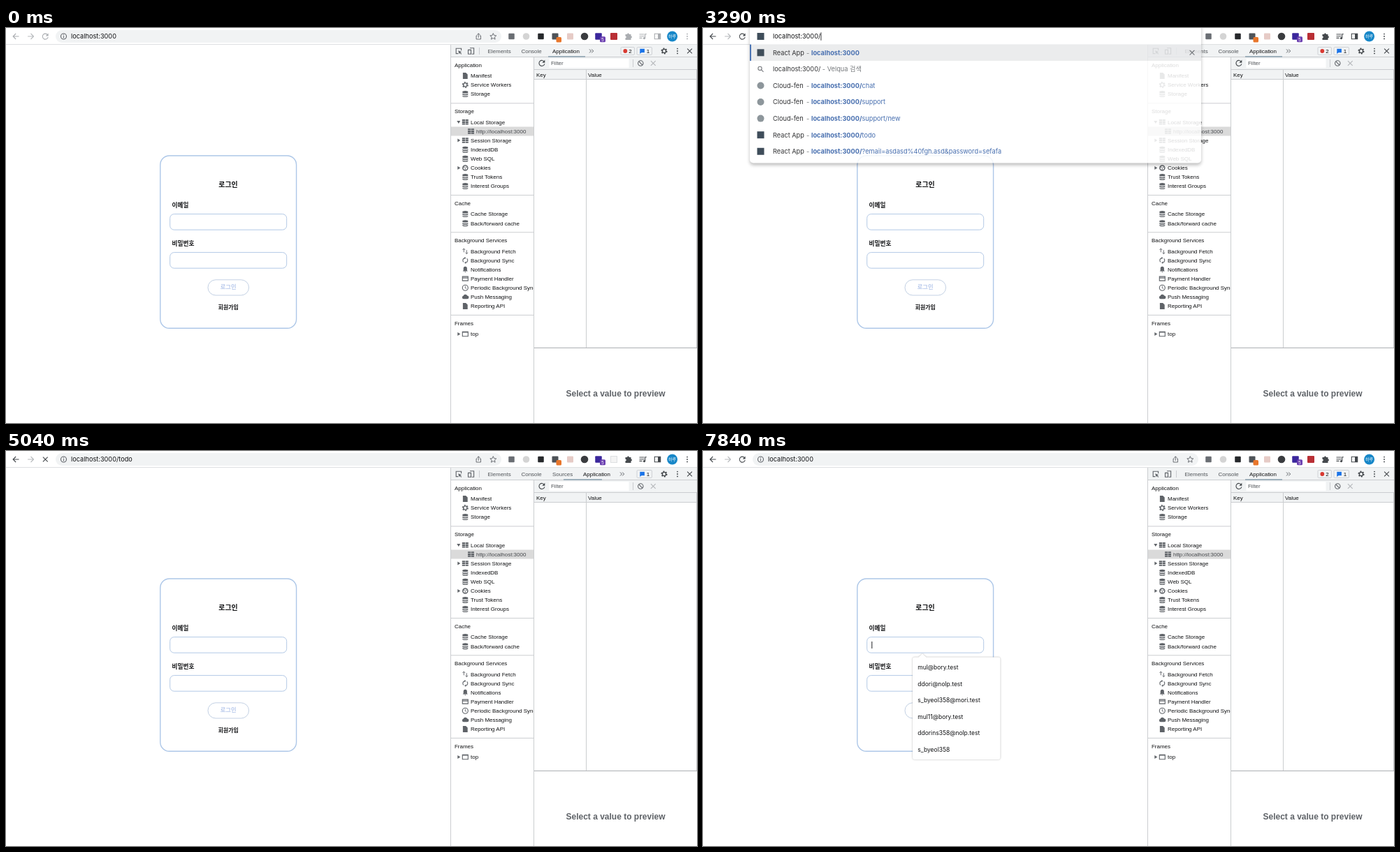
These frames come from a looping animation (989 px wide and 566 px high, 8 s). An HTML page:

```html
<!DOCTYPE html>
<html lang="ko">
<head>
<meta charset="utf-8">
<title>Login redirect</title>
<style>
  html, body { margin: 0; width: 100%; height: 100%; overflow: hidden; background: #fff; }
  svg { display: block; font-family: Inter, 'Noto Sans CJK KR', 'Noto Sans CJK', sans-serif; fill: #111214; }
  text { white-space: pre; }
  .dev { font-family: 'Liberation Sans', Arial, sans-serif; font-size: 7.97px; }
  .icon { fill: none; stroke: currentColor; stroke-width: 1.1; }
  .icon .solid { fill: currentColor; stroke: none; }
  .muted { fill: #606468; }
  .url { fill: #2a58a3; }
  .bold { font-weight: 700; }
  .menu { filter: drop-shadow(0 3px 2.5px rgba(0, 0, 0, .3)); }
  .modal { filter: drop-shadow(0 1px 2.5px rgba(0, 0, 0, .4)); }
  .hint { filter: drop-shadow(0 .5px 1px rgba(0, 0, 0, .3)); }
</style>
</head>
<body>
<svg id="stage" width="989" height="566" viewBox="0 0 989 566"></svg>
<script>
const LOOP = 8000;
const HOST = 'localhost:3000';
const GRAY = '#5f6368';

const text = (x, y, s, size, attrs = '') =>
  `<text x="${x}" y="${y}" ${size ? `font-size="${size}"` : ''} ${attrs}>${s}</text>`;
const rect = (x, y, w, h, fill, attrs = '') =>
  `<rect x="${x}" y="${y}" width="${w}" height="${h}" fill="${fill}" ${attrs}/>`;
const box = (x, y, w, h, r, stroke, width = 1) =>
  rect(x, y, w, h, '#fff', `rx="${r}" stroke="${stroke}" stroke-width="${width}"`);
const rule = (d, color = '#cbcdd0', width = 1) =>
  `<path d="${d}" fill="none" stroke="${color}" stroke-width="${width}"/>`;
const dot = (x, y, r, fill) => `<circle cx="${x}" cy="${y}" r="${r}" fill="${fill}"/>`;
const group = (id, body, attrs = '') => `<g id="${id}" ${attrs}>${body}</g>`;
const line = (d, attrs = '') => `<path d="${d}" ${attrs}/>`;
const solid = d => `<path class="solid" d="${d}"/>`;

const ICONS = {
  back: line('M4.2 0h-8.4m4-4l-4 4 4 4'),
  forward: line('M-4.2 0h8.4m-4-4l4 4-4 4'),
  reload: line('M3.4-2a4 4 0 1 0 .5 3') + solid('M4.3-4.6v4h-4z'),
  close: line('M-3.4-3.4l6.8 6.8m0-6.8l-6.8 6.8'),
  info: '<circle r="4"/>' + line('M0-.6v2.8M0-2.4v1'),
  share: line('M-1.8-1h-1.4v5h6.4v-5h-1.4M0 1.8v-6m-2 2l2-2 2 2', 'stroke-width=".9"'),
  star: line('M0-4.4l1.3 3 3.2.3-2.4 2.1.7 3.2-2.8-1.7-2.8 1.7.7-3.2-2.4-2.1 3.2-.3z', 'stroke-width=".9"'),
  puzzle: solid('M-4.5-3h2.6a1.4 1.4 0 0 1 2.8 0h2.6v2.6a1.4 1.4 0 0 1 0 2.8v2.6h-8v-2.7a1.3 1.3 0 0 0 0-2.6z'),
  playlist: line('M-5-3h7m-7 2.7h7m-7 2.7h4M3.2 2.5v-5.8h2.2') + '<circle class="solid" cx="2" cy="2.6" r="1.6"/>',
  panel: line('M-4.2-3.8h8.4v7.6h-8.4z') + solid('M.5-4h4v8h-4z'),
  dots: line('M0-3.4h.01M0 0h.01M0 3.4h.01', 'stroke-linecap="round" stroke-width="1.9"'),
  globe: '<circle class="solid" r="4.5"/>' + line('M-3.8-1.2h2.2l1.6 1.4-.8 3.2M.8-3.6l-.6 1.8 1.6.8.6 1.6 1.4.2', 'stroke="#fff"'),
  search: '<circle cx="-1" cy="-1" r="2.6"/>' + line('M1 1l3 3'),
  inspect: line('M3.6-.8v-3h-7.4v7.4h3') + solid('M-.8-.8l5 2-2 .8 2 2-.8.8-2-2-.8 1.6z'),
  device: line('M-1.5-4.2h5.6v8.4h-3M-4-1.6h4v5.8h-4z'),
  block: '<circle r="3.7"/>' + line('M-2.6-2.6l5.2 5.2'),
  file: solid('M-3.4-4.5h4.2l2.6 2.6v6.4h-6.8z'),
  gear: '<circle r="2.6" stroke-width="1.4"/><circle r="3.8" stroke-width="1.5" stroke-dasharray="1.9 2.08"/>',
  db: solid('M-4-3q0-1.5 4-1.5t4 1.5v.9q0 1.2-4 1.2t-4-1.2zM-4-1q0 1.4 4 1.4t4-1.4v1.7q0 1.3-4 1.3t-4-1.3zM-4 1.8q0 1.4 4 1.4t4-1.4v1.2q0 1.5-4 1.5t-4-1.5z'),
  table: [-3.8, -1.1, 1.6].map(y => solid(`M-4.5 ${y}h4.2v2.1h-4.2zM.3 ${y}h4.2v2.1h-4.2z`)).join(''),
  cookie: '<circle r="3.5" stroke-width="1.5"/>' + line('M-1.6-1h.01M1.2-.8h.01M0 1.4h.01', 'stroke-linecap="round" stroke-width="1.7"'),
  updown: line('M-2 1.5v-5.3m-1.8 1.8l1.8-1.8 1.8 1.8M2-1.5v5.3m-1.8-1.8l1.8 1.8 1.8-1.8', 'stroke-width=".9"'),
  sync: line('M-2.4 2.5a3.4 3.4 0 0 1 1.6-5.8M2.4-2.5a3.4 3.4 0 0 1-1.6 5.8') + solid('M-1-5l2.2 1.7-2.2 1.7zM1 5l-2.2-1.7 2.2-1.7z'),
  bell: solid('M-3.6 2.6h7.2l-1-1.4v-2.4q0-3-2.6-3t-2.6 3v2.4zM-1.1 3.2h2.2l-1.1 1.2z'),
  card: line('M-4-3h8v6h-8zM-4-1h8'),
  clock: '<circle r="4"/>' + line('M0-2.5v2.8l1.8 1', 'stroke-width=".9"'),
  cloud: solid('M-2.4 3a2.3 2.3 0 0 1-.3-4.5a3 3 0 0 1 5.6-.3a2.4 2.4 0 0 1-.3 4.8z'),
  window: line('M-4-3.2h8v6.6h-8zM-4-2.4h8'),
  react: rect(-5, -5, 10, 10, '#203040', 'stroke="none"'),
  earth: '<circle r="5" fill="#7b858b" stroke="none"/>'
};
const icon = (name, x, y, color = GRAY, id = '') =>
  `<g ${id && `id="${id}"`} class="icon" transform="translate(${x} ${y})" ${color && `color="${color}"`}>${ICONS[name]}</g>`;

function loginPage() {
  const field = (label, y) => text(237.5, y, label, 8.7, 'class="bold"') + box(234.7, y + 9.2, 167, 22.6, 6, '#b3c9e6');
  return box(220.8, 183, 194.8, 247.2, 13, '#adc7e8', 1.4) +
    text(318, 228.3, '로그인', 10, 'text-anchor="middle" class="bold"') +
    field('이메일', 257.4) + field('비밀번호', 312.4) +
    box(289, 360.8, 58.6, 22.2, 11.1, '#c3d1e4') +
    text(318.2, 374.4, '로그인', 8.3, 'text-anchor="middle" class="bold" style="fill:#b9caec"') +
    text(318.2, 403.3, '회원가입', 7.9, 'text-anchor="middle" class="bold"');
}

const SECTIONS = [
  [53, 'Application', 'file:Manifest', 'gear:Service Workers', 'db:Storage'],
  [119.5, 'Storage', 'table:Local Storage:open', 'table:' + HOST + ':sub', 'table:Session Storage:closed', 'db:IndexedDB',
    'db:Web SQL', 'cookie:Cookies:closed', 'db:Trust Tokens', 'db:Interest Groups'],
  [251.2, 'Cache', 'db:Cache Storage', 'db:Back/forward cache'],
  [304.4, 'Background Services', 'updown:Background Fetch', 'sync:Background Sync', 'bell:Notifications',
    'card:Payment Handler', 'clock:Periodic Background Sync', 'cloud:Push Messaging', 'file:Reporting API'],
  [423, 'Frames', 'window:top:closed']
];

function sidebar() {
  return SECTIONS.map(([top, title, ...rows], i) =>
    (i ? rule(`M637 ${top - 11.6}H755`) : '') + text(642, top + 2.8, title) +
    rows.map((row, j) => {
      const y = top + 15.4 + j * 13.1;
      const parts = row.split(':');
      const kind = parts[parts.length - 1];
      if (kind === 'sub')
        return rect(637, y - 6.5, 118.5, 13, '#dadada') + icon('table', 665.5, y) + text(673, y + 2.8, 'http://' + HOST, 0, 'fill="#45484c"');
      const arrow = { open: `M645.3 ${y - 1.8}h5l-2.5 4z`, closed: `M646.3 ${y - 2.5}v5l4-2.5z` }[kind];
      return (arrow ? `<path d="${arrow}" fill="#5f6368"/>` : '') + icon(parts[0], 657.3, y) + text(665, y + 2.8, parts[1]);
    }).join('')).join('');
}

function devtools() {
  const tab = (x, s, active) => text(x, 35.8, s, 0, active ? '' : 'fill="#505458"');
  const underline = (from, to) => rule(`M${from} 41H${to}`, '#5f7f93');
  const more = x => rule(`M${x - 3} 30.5l2.5 2.5-2.5 2.5m3.2-5l2.5 2.5-2.5 2.5`, GRAY);
  const badge = (x, w) => rect(x, 27.5, w, 11, '#f1f3f4', 'rx="1.5" stroke="#cfd2d6"');
  return rect(637, 24, 352, 542, '#fff') + sidebar() +
    rect(755.5, 41, 234, 525, '#fff') + rect(637, 24, 352, 17.5, '#f1f3f4') + rect(756, 42, 233, 31.5, '#f1f3f4') +
    rule('M636.5 24V566M637 41.5H989M755.5 42V566M756 59.5H989M756 73.5H989M830.5 60V458M988.5 60V458') +
    rule('M756 458.4H989', '#b9bbbe', 1.3) +
    icon('inspect', 648, 33) + icon('device', 665.5, 33) + rule('M677.5 28V38') +
    tab(689.5, 'Elements') + tab(737.5, 'Console') +
    group('tabs', tab(782, 'Application', 1) + underline(776, 829) + more(838) + badge(880, 19.5) +
      dot(886.3, 33, 2.9, '#d93a32') + text(891.3, 35.8, '2', 0, 'id="errors"')) +
    group('loadingTabs', tab(782, 'Sources') + tab(826, 'Application', 1) + underline(798, 853) + more(882)) +
    badge(903, 21.5) + rect(907.3, 29.8, 6.6, 5.4, '#1a73e8') + `<path d="M907.3 34.5h3l-3 2.6z" fill="#1a73e8"/>` +
    text(916.8, 35.8, '1') +
    icon('gear', 942, 33, '#45494d') + icon('dots', 961, 33, '#45494d') + icon('close', 978.5, 33, '#45494d') +
    icon('reload', 767, 50.3, '#45494d') + rect(777.5, 44, 114, 13, '#fff') + text(780, 53.4, 'Filter', 0, 'fill="#505458"') +
    rule('M897.5 45V56') + icon('block', 908.3, 50.5) + icon('close', 926.3, 50.5, '#b4b7ba') +
    text(759, 69.7, 'Key') + text(833, 69.7, 'Value') +
    text(872.5, 528, 'Select a value to preview', 12, `text-anchor="middle" font-weight="bold" style="fill:${GRAY}"`);
}

function toolbar() {
  const square = (x, fill, size = 9) => rect(x - size / 2, 12 - size / 2, size, size, fill, 'rx="1"');
  return rect(0, 0, 989, 24, '#fff') + rule('M0 23.6H989', '#dcdee0') +
    group('chrome', icon('back', 14.3, 12, '') + icon('reload', 56.3, 12, '', 'reload') + icon('close', 56.3, 12, '', 'stop') +
      icon('puzzle', 891, 12, '') + icon('playlist', 911.5, 12, '') + icon('panel', 932.5, 12, '') + icon('dots', 975, 12, '')) +
    icon('forward', 35.3, 12, '#b7babd') +
    square(723.5, '#6a6e73', 8.5) + dot(744.5, 12, 4.8, '#d4d4d4') + square(765.5, '#26282b', 8.5) +
    square(786, '#4e5358') + rect(787.5, 13, 7.5, 7.5, '#e8762b', 'rx="1.5"') + square(807.5, '#e6cbc6') +
    dot(828, 12, 5.3, '#3a3c3f') + square(848, '#3b279c', 9.5) + rect(850, 12.2, 8, 8, '#6b3fb0', 'rx="1.5"') +
    text(854, 18.9, '5', 6.5, 'text-anchor="middle" style="fill:#fff"') +
    group('extension', square(870, '#b92f35', 10)) + group('dimExtension', rect(865.5, 7.5, 9, 9, '#f4f4f4', 'stroke="#dddfe1"')) +
    dot(953.6, 12, 7.5, '#1787c8') + text(953.6, 14.3, '하루', 6, 'text-anchor="middle" style="fill:#fff"') +
    group('omnibox', rect(71, 3, 638, 18, '#f1f3f4', 'id="pill" rx="9"') + icon('share', 676.3, 12) + icon('star', 697.3, 12));
}

const REACT = 'React App', EARTH = 'Cloud-fen';
const searchRow = typed => ['search', '', '', `${HOST}/${typed}<tspan class="muted"> - Velqua 검색</tspan>`];
const todoRow = typed => ['react', REACT, `${HOST}/${typed}`, 'todo'.slice(typed.length)];
const completing = typed => [todoRow(typed), searchRow(typed)];
const SUGGESTIONS = [
  { at: 3290, typed: '', rest: '', rows: [
    ['react', REACT, HOST, ''], searchRow(''),
    ['earth', EARTH, HOST + '/', 'chat'], ['earth', EARTH, HOST + '/', 'support'], ['earth', EARTH, HOST + '/', 'support/new'],
    todoRow(''), ['react', REACT, HOST + '/', '?email=asdasd%40fgh.asd&amp;password=sefafa']] },
  { at: 3780, typed: 't', rest: 'odo', rows: completing('t') },
  { at: 4060, typed: 'to', rest: 'do', rows: completing('to') },
  { at: 4550, typed: 'to', rest: '', rows: [['globe', '', HOST + '/to', ''], searchRow('to'), todoRow('to')] },
  { at: 4690, typed: 'tod', rest: 'o', rows: completing('tod') },
  { at: 4760, typed: 'todo', rest: '', rows: completing('todo') }
];

function popup({ rows }) {
  const bottom = 28.4 + rows.length * 23.58;
  return rect(67, -6, 646, bottom + 6, '#fff', 'rx="5" class="menu"') +
    rect(67, 23.6, 646, 23.4, '#e8e9eb') + rect(67, 23.6, 2, 23.4, '#2f5fa8') +
    rows.map(([mark, title, bold, rest], i) => {
      const y = 35.3 + i * 23.58;
      const link = `<tspan class="bold">${bold}</tspan>${rest}`;
      return icon(mark, 82.5, y) + (title
        ? text(100, y + 3.3, title, 9.2) + text(148, y + 3.3, '-', 9.2, 'class="muted"') + text(155, y + 3.3, link, 9.2, 'class="url"')
        : text(100, y + 3.3, link, 9.2, bold && 'class="url"'));
    }).join('') +
    (rows[0][1] ? icon('close', 700, 35.3) : '') + icon(rows[0][0], 82.5, 12);
}

const dialog = () => rect(348, 22, 293, 84.6, '#fff', 'rx="3" class="modal"') +
  text(358.5, 42.3, HOST + ' 내용:', 9.8) + text(358.5, 61.3, 'Unauthorized', 8.3) +
  rect(588.7, 75.2, 42, 21, '#1a73e8', 'rx="2.5"') +
  text(609.5, 88.4, '확인', 7.6, 'text-anchor="middle" font-weight="700" style="fill:#fff"');

const EMAILS = ['mul@bory.test', 'ddori@nolp.test', 's_byeol358@mori.test', 'mul11@bory.test', 'ddorins358@nolp.test', 's_byeol358'];
const autofill = () => rect(241.3, 273, 1, 10, '#202124') +
  `<path class="hint" d="M303 295.5h5.500l5.500-5 5.500 5h103q3 0 3 3v140.500q0 3-3 3h-119.500q-3 0-3-3v-140.500q0-3 3-3z" fill="#fff"/>` +
  EMAILS.map((email, i) => text(307.3, 313.2 + i * 23.55, email, 8.5)).join('');

const $ = id => document.getElementById(id);
$('stage').innerHTML = loginPage() + group('dev', devtools(), 'class="dev"') + toolbar() + group('popup', '') +
  group('address', icon('info', 82.5, 12, GRAY, 'info') + rect(93, 6, 0, 12, '#b3d4fc', 'id="selection"') +
    text(93, 15.2, HOST, 9.2, 'id="url"') + rect(158, 6.3, .9, 11.5, '#202124', 'id="caret"')) +
  group('dialog', dialog()) + group('autofill', autofill());

const show = (id, opacity) => $(id).setAttribute('opacity', +opacity);
const set = (id, attrs) => Object.entries(attrs).forEach(([k, v]) => $(id).setAttribute(k, v));
const between = (t, a, b) => t >= a && t < b;
const ramp = (t, a, b) => Math.min(1, Math.max(0, (t - a) / (b - a)));
let shown;

function render(t) {
  const focused = between(t, 1960, 5040);
  const suggesting = between(t, 3290, 5040);
  const loading = between(t, 5040, 5180);
  const selectedAll = between(t, 2030, 2730);
  const suggestion = suggesting && SUGGESTIONS.filter(s => t >= s.at).pop();

  $('chrome').style.color = t < 1960 ? '#aaadb1' : '#45494d';
  show('reload', !loading);
  show('stop', loading);
  show('tabs', !loading);
  show('loadingTabs', loading);
  show('extension', !loading);
  show('dimExtension', loading);
  $('errors').textContent = between(t, 5180, 6300) ? 1 : 2;

  show('omnibox', !suggesting);
  set('pill', focused ? { fill: '#fff', stroke: '#34619f', 'stroke-width': 1.7 } : { fill: '#f1f3f4', stroke: 'none' });
  show('info', !suggesting);
  show('popup', suggesting && (t < 3360 ? .86 : 1));
  if (suggestion && suggestion !== shown) $('popup').innerHTML = popup(shown = suggestion);

  const x = suggesting ? 100 : 93;
  const typed = suggesting ? `${HOST}/${suggestion.typed}` : loading ? HOST + '/todo' : HOST;
  const value = typed + (suggesting ? suggestion.rest : '');
  if ($('url').textContent !== value) $('url').textContent = value;
  set('url', { x });
  const full = $('url').getComputedTextLength();
  const head = selectedAll ? 0 : $('url').getSubStringLength(0, typed.length);
  set('selection', { x: x + head, width: Math.max(0, full - head) });
  set('caret', { x: x + head + .2 });
  show('selection', focused && full - head > 1);
  show('caret', focused && full - head <= 1);

  const first = ramp(t, 5200, 5460) * (1 - ramp(t, 6170, 6300));
  const second = ramp(t, 6310, 6510) * (1 - ramp(t, 6730, 6930));
  show('dialog', Math.max(first, second));
  show('autofill', t >= 7840);
}

function tick(now) {
  render(now % LOOP);
  requestAnimationFrame(tick);
}
tick(0);
</script>
</body>
</html>
```
